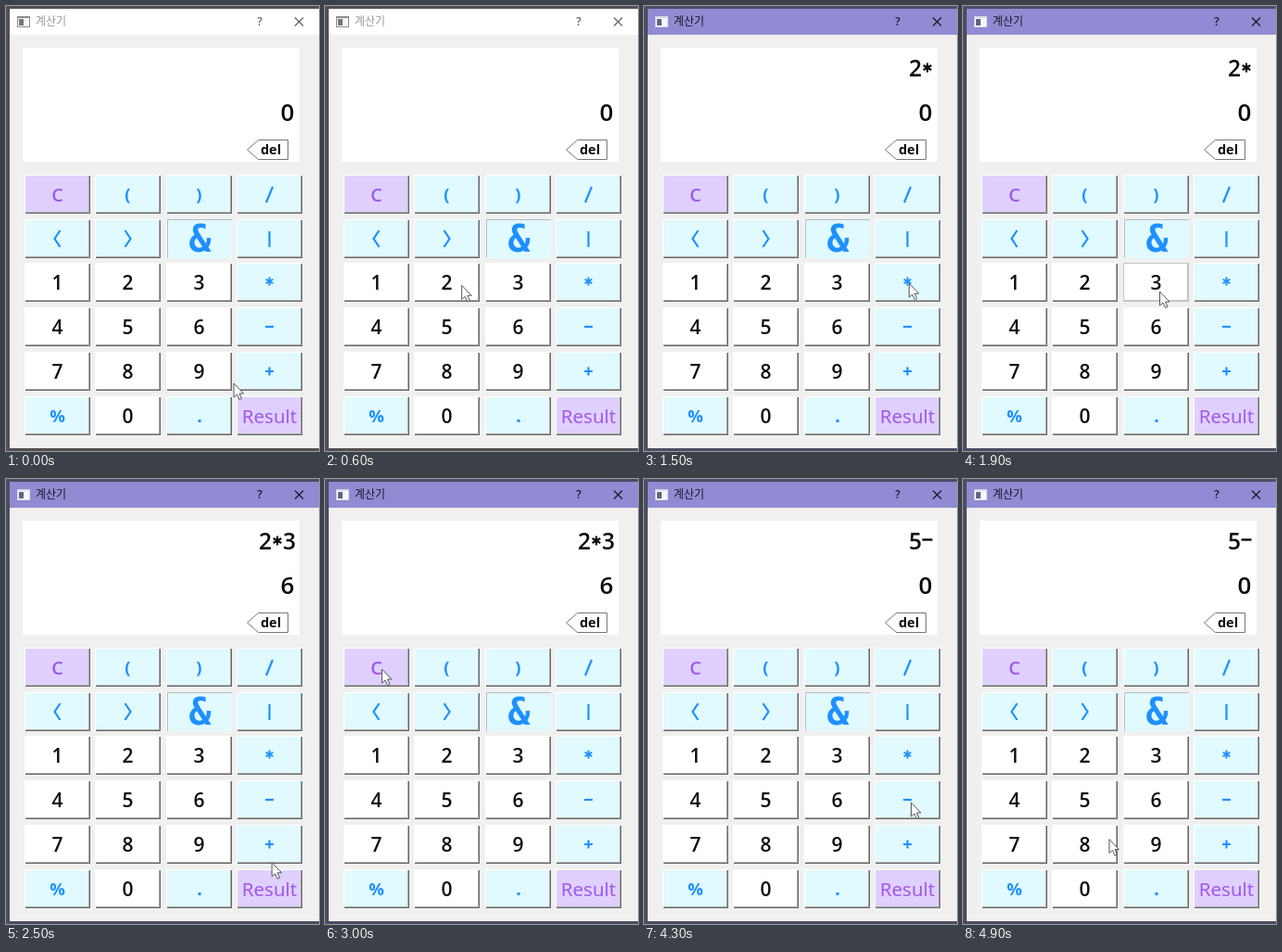
An HTML page with a canvas that plays this animation: 338x480 px, repeating every 5 s.

```html
<!DOCTYPE html>
<html lang="ko">
<head>
<meta charset="utf-8">
<title>계산기</title>
<style>
html, body { margin: 0; width: 100%; height: 100%; overflow: hidden; background: #f0f0f0; }
canvas { display: block; }
</style>
</head>
<body>
<canvas id="stage" width="338" height="480"></canvas>
<script>
const ctx = document.getElementById('stage').getContext('2d');
const LOOP = 5000, PRESS = 60, DWELL = 70;
const BLUE = '#1e90ff', PURPLE = '#a158ec', INK = '#0c0c0c';
const KEYS = ['C()/', '<>&|', '123*', '456-', '789+', '%0.R'];

// time, key, pointer offset from the key's centre
const CLICKS = [
  [850, '2', 1, -13], [1400, '*', 3, 1], [1950, '3', 4, 10], [2300, 'R', 31, -2],
  [3070, 'C', 6, 2], [3600, '5', 4, 2], [4250, '-', 4, 3]
];
const FROM = { x: 246, y: 407 }, TO = { x: 150, y: 391 };

const keyX = c => Math.floor(20 + 76.5 * c);
const keyY = r => Math.round(182 + 47.7 * r);

function center(key) {
  const r = KEYS.findIndex(row => row.includes(key));
  return { x: keyX(KEYS[r].indexOf(key)) + 35.5, y: keyY(r) + 21 };
}

function rect(x, y, w, h, color) {
  ctx.fillStyle = color;
  ctx.fillRect(x, y, w, h);
}

function line(points, color, width) {
  ctx.beginPath();
  points.forEach(([x, y]) => ctx.lineTo(x, y));
  ctx.strokeStyle = color;
  ctx.lineWidth = width;
  ctx.stroke();
}

function shape(points, fill, stroke) {
  ctx.beginPath();
  points.forEach(([x, y]) => ctx.lineTo(x, y));
  ctx.closePath();
  ctx.fillStyle = fill;
  ctx.fill();
  ctx.strokeStyle = stroke;
  ctx.lineWidth = 1;
  ctx.stroke();
}

function text(s, x, y, size, color, weight = 600, family = 'Open Sans') {
  ctx.font = `${weight} ${size}px "${family}", "Noto Sans CJK KR", sans-serif`;
  ctx.textAlign = 'center';
  ctx.fillStyle = color;
  ctx.fillText(s, x, y);
}

function star(x, y, r, color, width) {
  for (let i = 0; i < 3; i++) {
    const a = Math.PI / 2 + i * Math.PI / 3;
    const dx = r * Math.cos(a), dy = r * Math.sin(a);
    line([[x - dx, y - dy], [x + dx, y + dy]], color, width);
  }
}

function symbol(key, x, y) {
  const stroke = (...pts) => line(pts.map(([dx, dy]) => [x + dx, y + dy]), BLUE, 2.2);
  switch (key) {
    case '<': return stroke([3, -9], [-3, 0], [3, 9]);
    case '>': return stroke([-3, -9], [3, 0], [-3, 9]);
    case '/': return stroke([-3.5, 9], [3.5, -8]);
    case '|': return stroke([0, -8], [0, 9]);
    case '-': return stroke([-4.5, 0], [4.5, 0]);
    case '+': return stroke([-4.5, 0], [4.5, 0], [0, 0], [0, -4.5], [0, 4.5]);
    case '*': return star(x, y - 1, 4.5, BLUE, 2);
    case '.': return rect(x - 1, y + 4, 3, 3, BLUE);
    case '&': return text(key, x + 1, y + 14, 40, BLUE, 700, 'DejaVu Sans Mono');
    case 'R': return text('Result', x, y + 8, 20.5, PURPLE, 500, 'Noto Sans');
    case 'C': return text(key, x, y + 8, 20, PURPLE, 600);
  }
  if (/\d/.test(key)) text(key, x, y + 8, 21, INK);
  else text(key, x, y + 7, 18.5, BLUE, 700);
}

function button(key, x, y, pressed) {
  const face = /\d/.test(key) ? '#fff' : /[CR]/.test(key) ? '#dfd0ff' : '#e0faff';
  rect(x, y, 71, 42, '#fff');
  if (key === '&') {
    rect(x + 1, y, 70, 42, '#b4bcbe');
    rect(x + 2, y + 1, 69, 41, face);
  } else {
    if (pressed) rect(x, y, 71, 42, '#c4c4c8');
    else {
      rect(x + 1, y + 1, 70, 41, '#666');
      rect(x + 1, y + 1, 69, 40, '#aaa');
    }
    rect(x + 1, y + 1, 68, 39, face);
  }
  symbol(key, x + 35.5, y + 21);
}

function readout(s) {
  [...s].forEach((c, i) => {
    const x = 306 - 13 * (s.length - 1 - i);
    if (c === '*') star(x, 66.5, 5, INK, 2.2);
    else if (c === '-') line([[x - 5.5, 65.5], [x + 5.5, 65.5]], INK, 2.4);
    else text(c, x, 76, 24.5, INK);
  });
}

function windowFrame(active) {
  rect(0, 0, 338, 480, active ? '#4c4d61' : '#505054');
  rect(4, 3, 334, 28, active ? '#918bd3' : '#fff');
  rect(4, 31, 334, 446, '#f0f0f0');

  rect(12, 11, 14, 12, active ? '#d9d9ea' : '#8a8a8a');
  rect(13, 13, 12, 9, '#f8f8f8');
  rect(14, 14, 5, 7, active ? '#5e6580' : '#777');
  const ink = active ? '#191925' : '#666';
  text('계산기', 48.5, 21, 12, active ? ink : '#999', 400, 'Noto Sans CJK KR');
  text('?', 274, 21, 12, ink);
  line([[312, 12.5], [321, 21.5]], ink, 1.3);
  line([[321, 12.5], [312, 21.5]], ink, 1.3);
}

// Rests on each clicked key, then glides to the next one.
function pointer(t) {
  let from = FROM, leave = 0, to = TO, arrive = LOOP;
  for (const [time, key, dx, dy] of CLICKS) {
    const c = center(key), spot = { x: c.x + dx, y: c.y + dy };
    if (t < time + DWELL) {
      to = spot;
      arrive = time - DWELL;
      break;
    }
    from = spot;
    leave = time + DWELL;
  }
  const u = Math.min(1, (t - leave) / (arrive - leave)), k = u * u * (3 - 2 * u);
  const x = from.x + (to.x - from.x) * k, y = from.y + (to.y - from.y) * k;
  const arrow = [[0, 0], [0, 15], [3.5, 12], [6, 17.5], [8.5, 16.5], [6, 11], [10.5, 11]];
  shape(arrow.map(([dx, dy]) => [x + dx, y + dy]), '#fff', '#55555c');
}

function calculate(t) {
  let input = '', result = 0;
  for (const [time, key] of CLICKS) {
    if (time > t) break;
    if (key === 'C') { input = ''; result = 0; }
    else if (key === 'R') result = input.split('*').reduce((a, b) => a * b);
    else input += key;
  }
  return { input, result };
}

function draw(t) {
  const { input, result } = calculate(t);
  const held = CLICKS.find(([time]) => t >= time - PRESS && t < time);
  windowFrame(t >= CLICKS[0][0] - PRESS);
  rect(18, 45, 299, 123, '#fff');
  readout(input);
  text(result, 304, 124, 26, INK);
  shape([[260.5, 155], [272.5, 144.5], [304.5, 144.5], [304.5, 165.5], [272.5, 165.5]], '#fff', '#777');
  text('del', 286, 160, 14.5, INK, 700);
  KEYS.forEach((row, r) => [...row].forEach((key, c) =>
    button(key, keyX(c), keyY(r), held?.[1] === key)));
  pointer(t);
}

const start = performance.now();
function tick() {
  draw((performance.now() - start) % LOOP);
  requestAnimationFrame(tick);
}
tick();
</script>
</body>
</html>
```
